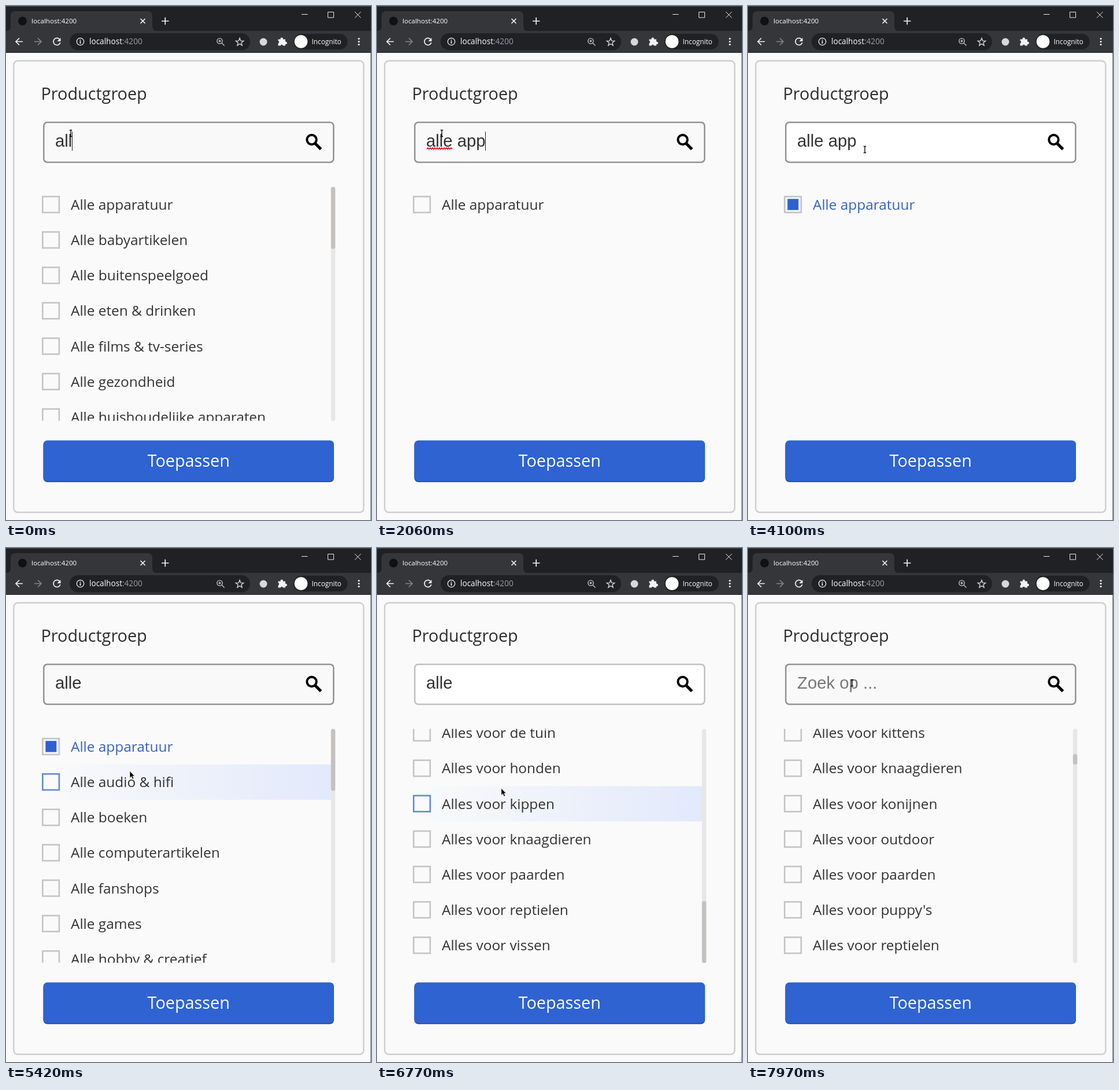
An HTML page for the animation above (8000 ms loop, 631 by 888 pixels).

```html
<!DOCTYPE html>
<html lang="nl">
<head>
<meta charset="utf-8">
<title>Productgroep</title>
<style>
  html, body { margin: 0; width: 100%; height: 100%; overflow: hidden; background: #fafafa; }
  svg { display: block; width: 631px; height: 888px; }
  text { font-family: "Open Sans", sans-serif; fill: #2d2d2d; white-space: pre; }
  .chrome text { fill: #fff; }
  .line { fill: none; stroke: #f1f3f4; stroke-width: 1.7; }
  .thin { fill: none; stroke: #e8eaed; stroke-width: 1; }
  .row text { font-size: 24.4px; }
  .row .box { fill: #fafafa; stroke: #c4c4c4; stroke-width: 2.6; }
  .row .mark { fill: #2e62d0; }
  .row .glow { fill: url(#glow); }
  #query { font: 29.3px "Liberation Sans", Arial, sans-serif; }
</style>
</head>
<body>
<svg viewBox="0 0 631 888">
  <defs>
    <linearGradient id="glow">
      <stop offset="0" stop-color="#e2e9fb" stop-opacity="0"/>
      <stop offset="1" stop-color="#e2e9fb"/>
    </linearGradient>
    <clipPath id="view"><rect x="60" y="312.5" width="502" height="404"/></clipPath>
  </defs>

  <rect width="631" height="888" fill="#fafafa"/>

  <g class="chrome">
    <rect width="631" height="81" fill="#202124"/>
    <rect width="631" height="1" fill="#4a4b4e"/>
    <path d="M0 43q8 0 8-8V17q0-8 8-8H245q8 0 8 8V35q0 8 8 8H631V80.5H0z" fill="#35363a"/>
    <circle cx="28.5" cy="26" r="7.5" fill="#101114"/>
    <text x="44" y="30" font-size="11.6">localhost:4200</text>
    <path class="line" d="M232.5 22l8 8m0-8l-8 8M269 26h12.500M275.200 19.800v12.500"/>
    <path class="thin" d="M511 14.500h10.500M556.500 10.500h10v9.500h-10zM603 10l10.500 10.500m0-10.500L603 20.500"/>

    <path class="line" d="M29 61.500H17m6-6l-6 6 6 6"/>
    <path class="line" d="M49 61.500h12m-6-6l6 6-6 6" style="stroke:#84868a"/>
    <path class="line" d="M92.500 57.500a6 6 0 1 0 1.300 5.500"/>
    <path d="M94.500 55v6h-6z" fill="#f1f3f4"/>

    <rect x="110" y="47" width="312" height="29.500" rx="14.700" fill="#202124"/>
    <circle class="line" cx="128.500" cy="61.500" r="6.200" style="stroke-width:1.300"/>
    <path class="line" d="M128.500 60.500v4.500m0-7v1.400"/>
    <text x="144" y="66.300" font-size="13.600">localhost<tspan fill="#9aa0a6">:4200</tspan></text>
    <g style="stroke-width:1.400">
      <circle cx="369.500" cy="60.500" r="4.600" fill="none" stroke="#c4c7cb"/>
      <path d="M373 64l4.500 4.500M367.300 60.500h4.400m-2.200-2.200v4.400" stroke="#c4c7cb"/>
      <path id="star" fill="none" stroke="#d4d6d9"/>
    </g>
    <circle cx="445" cy="62" r="6.500" fill="#d6d8db"/>
    <path d="M470.500 57.500h4a2.300 2.300 0 1 1 4.400 0h4v4.200a2.300 2.300 0 1 1 0 4.400v2.400h-4a2.300 2.300 0 0 0-4.400 0h-4v-4a2.300 2.300 0 0 0 0-4.400z" fill="#f1f3f4"/>
    <rect x="497" y="48" width="93.500" height="27" rx="13.500" fill="#202124"/>
    <circle cx="510" cy="61.500" r="11.300" fill="#fff"/>
    <text x="528.500" y="66" font-size="11.800">Incognito</text>
    <g fill="#f1f3f4">
      <circle cx="610" cy="56.500" r="1.600"/><circle cx="610" cy="61.500" r="1.600"/><circle cx="610" cy="66.500" r="1.600"/>
    </g>
  </g>

  <rect x="13.300" y="94.800" width="605" height="780" rx="7" fill="none" stroke="#cfcfcf" stroke-width="2.500"/>
  <text x="60.500" y="161.500" font-size="28.800">Productgroep</text>

  <rect id="field" x="65.300" y="201" width="501" height="69" rx="6" stroke-width="2.500"/>
  <text id="query" x="85" y="243.300"></text>
  <path id="squiggle" fill="none" stroke="#e81123" stroke-width="1.500"/>
  <rect id="caret" y="217" width="1" height="33" fill="#222"/>
  <g fill="none" stroke="#000">
    <circle cx="528.500" cy="231" r="8.200" stroke-width="4"/>
    <path d="M534.500 237.500l10 10" stroke-width="5.200"/>
  </g>

  <g id="list" clip-path="url(#view)"></g>
  <g id="bar">
    <rect x="561.800" y="312.500" width="7.400" height="404.500" rx="3.500" fill="#e7e7e7"/>
    <rect id="thumb" x="561.800" width="7.400" rx="3.500" fill="#c4c1be"/>
  </g>

  <rect x="64.500" y="752" width="502.500" height="70.500" rx="7" fill="#20417f"/>
  <rect x="64.500" y="750.500" width="502.500" height="70.500" rx="7" fill="#2e63d1"/>
  <text x="315.700" y="796" font-size="28.800" text-anchor="middle" style="fill:#fff">Toepassen</text>
  <rect x="630" y="81" width="1" height="807" fill="#77787a"/>

  <path id="arrow" d="M0 0v11.500l2.700-2.400 2 4.400 2-.9-2-4.300h3.500z" fill="#000" stroke="#fff" stroke-width=".5"/>
  <path id="beam" d="M-2.200-5.500h1.600l.6.600.6-.6h1.600M0-5v10M-2.200 5.500h1.600l.6-.6.6.6h1.600" fill="none" stroke="#000" stroke-width="1.300"/>
</svg>

<script>
const LOOP = 8000, TOP = 312.5, VIEW = 404.5, PITCH = 61.17, END = 25 * PITCH - VIEW;
const $ = id => document.getElementById(id);

const alle = words => words.split(',').map(w => 'Alle ' + w);
const voor = words => words.split(',').map(w => 'Alles voor ' + w);
const first = alle('apparatuur,babyartikelen,buitenspeelgoed,eten & drinken,films & tv-series,gezondheid,huishoudelijke apparaten');
const second = [
  ...alle('apparatuur,audio & hifi,boeken,computerartikelen,fanshops,games,hobby & creatief,huishouden,keukenapparaten,luxe merken,muziek,persoonlijke verzorging,reisartikelen,speelgoed,sportartikelen,wonen'),
  ...voor("baby's,de keuken,de tuin,honden,kippen,knaagdieren,paarden,reptielen,vissen")
];
const pets = voor("kittens,knaagdieren,konijnen,outdoor,paarden,puppy's,reptielen,vissen");
const full = [...second.slice(0, 18), ...pets];
const shifted = [...second.slice(0, 18), ...pets.slice(1)];

// Stepped values: [time, value]
const texts = [[0, 'all'], [340, 'alle'], [650, 'alle '], [1200, 'alle a'], [1620, 'alle ap'], [2060, 'alle app'],
  [4220, 'alle ap'], [4460, 'alle a'], [4640, 'alle '], [4870, 'alle'], [7490, 'all'], [7820, 'al'], [7970, '']];
const lists = [[0, [first, 25]], [650, [first, 15]], [1200, [first, 1]], [4460, [second, 2]], [4640, [second, 16]],
  [4870, [second, 25]], [7490, [shifted, 40]], [7820, [shifted, 60]], [7970, [full, 170]]];
const carets = [[0, true], [2590, false], [3600, true], [4100, false], [4220, true], [5120, false], [7090, true], [7970, false]];
const borders = [[0, '#929292'], [2970, '#c2c0be'], [3500, '#929292'], [5480, '#c2c0be'], [7040, '#929292']];
const fills = [[0, '#f9f9f9'], [2970, '#fff'], [5310, '#f9f9f9'], [5480, '#fff'], [7490, '#f9f9f9']];
const hoverScrolls = [[0, 0], [5800, 290], [6070, END]];

// Eased values: [time, ...numbers]
const pointer = [[0, 112, 220], [2500, 112, 220], [2610, 115, 262], [2700, 121, 318], [2790, 126, 345], [3080, 126, 345],
  [3240, 150, 322], [3400, 184, 275], [3560, 202, 248], [5260, 202, 248], [5340, 206, 325], [5420, 214, 385],
  [5520, 220, 445], [5620, 222, 495], [5950, 222, 495], [6070, 222, 502], [6130, 228, 515], [6190, 216, 512],
  [6400, 216, 512], [6600, 219, 470], [6770, 215, 416], [6900, 203, 340], [7000, 190, 270], [7080, 180, 233]];
const scrolls = [[0, 0], [5620, 0], [5700, 60], [5800, 210], [5890, 373], [5950, 610], [6010, 910], [6070, END]];

const at = (steps, t) => steps.findLast(s => s[0] <= t)[1];

function glide(keys, t) {
  const i = keys.findLastIndex(k => k[0] <= t), a = keys[i], b = keys[i + 1] || a;
  const p = a === b ? 0 : (t - a[0]) / (b[0] - a[0]);
  return a.slice(1).map((v, j) => v + (b[j + 1] - v) * p);
}

function show(el, on) { el.style.display = on ? '' : 'none'; }

function add(parent, tag, attrs) {
  const el = document.createElementNS('http://www.w3.org/2000/svg', tag);
  for (const name in attrs) el.setAttribute(name, attrs[name]);
  return parent.appendChild(el);
}

const rows = Array.from({ length: 8 }, () => {
  const g = add($('list'), 'g', { class: 'row' });
  return {
    g,
    glow: add(g, 'rect', { class: 'glow', x: 62, y: 0.3, width: 500, height: 61 }),
    box: add(g, 'rect', { class: 'box', x: 63.3, y: 16.7, width: 28.6, height: 27.6 }),
    mark: add(g, 'rect', { class: 'mark', x: 68.3, y: 20.8, width: 19, height: 19.2 }),
    label: add(g, 'text', { x: 112, y: 39.4 })
  };
});

$('squiggle').setAttribute('d', 'M86 247.5' + 'l2-2.6l2 2.6'.repeat(11));
$('star').setAttribute('d', 'M' + Array.from({ length: 10 }, (_, i) => {
  const r = i % 2 ? 3 : 7, a = i * Math.PI / 5;
  return (404 + r * Math.sin(a)).toFixed(1) + ' ' + (62.5 - r * Math.cos(a)).toFixed(1);
}).join('L') + 'z');

const charWidth = c => c === 'l' ? 0.222 : c === ' ' ? 0.278 : 0.556;

function drawField(t) {
  const text = at(texts, t);
  $('query').textContent = text || 'Zoek op ...';
  $('query').style.fill = text ? '#333' : '#777';
  const width = [...text].reduce((sum, c) => sum + charWidth(c), 0) * 29.3;
  $('caret').setAttribute('x', Math.round(84.7 + width));
  show($('caret'), at(carets, t));
  show($('squiggle'), t >= 650 && t < 2970);
  $('field').setAttribute('stroke', at(borders, t));
  $('field').setAttribute('fill', at(fills, t));
}

function drawList(t, x, y) {
  const [items, count] = at(lists, t), [scroll] = glide(scrolls, t);
  const inside = x > 62 && x < 562 && y > TOP && y < TOP + VIEW;
  const hovered = inside ? Math.floor((y - TOP + at(hoverScrolls, t)) / PITCH) : -1;
  const start = Math.floor(scroll / PITCH);

  rows.forEach((row, i) => {
    const n = start + i, name = n < count && items[n];
    show(row.g, name);
    if (!name) return;
    const checked = n === 0 && t >= 2970;
    row.g.setAttribute('transform', `translate(0 ${TOP + n * PITCH - scroll})`);
    row.label.textContent = name;
    row.label.style.fill = checked ? '#3762bd' : '#333';
    row.box.style.stroke = n === hovered ? '#6389d8' : '#c4c4c4';
    show(row.mark, checked);
    show(row.glow, n === hovered);
  });

  const height = count * PITCH;
  show($('bar'), height > VIEW);
  if (height <= VIEW) return;
  const size = Math.max(18, VIEW * VIEW / height);
  $('thumb').setAttribute('height', size);
  $('thumb').setAttribute('y', TOP + scroll / (height - VIEW) * (VIEW - size));
}

function drawPointer(x, y) {
  const typing = y > 200 && y < 271;
  show($('beam'), typing);
  show($('arrow'), !typing);
  $(typing ? 'beam' : 'arrow').setAttribute('transform', `translate(${x} ${y})`);
}

const origin = performance.now();
function frame() {
  const t = (performance.now() - origin) % LOOP;
  const [x, y] = glide(pointer, t);
  drawField(t);
  drawList(t, x, y);
  drawPointer(x, y);
  requestAnimationFrame(frame);
}
frame();
</script>
</body>
</html>
```
